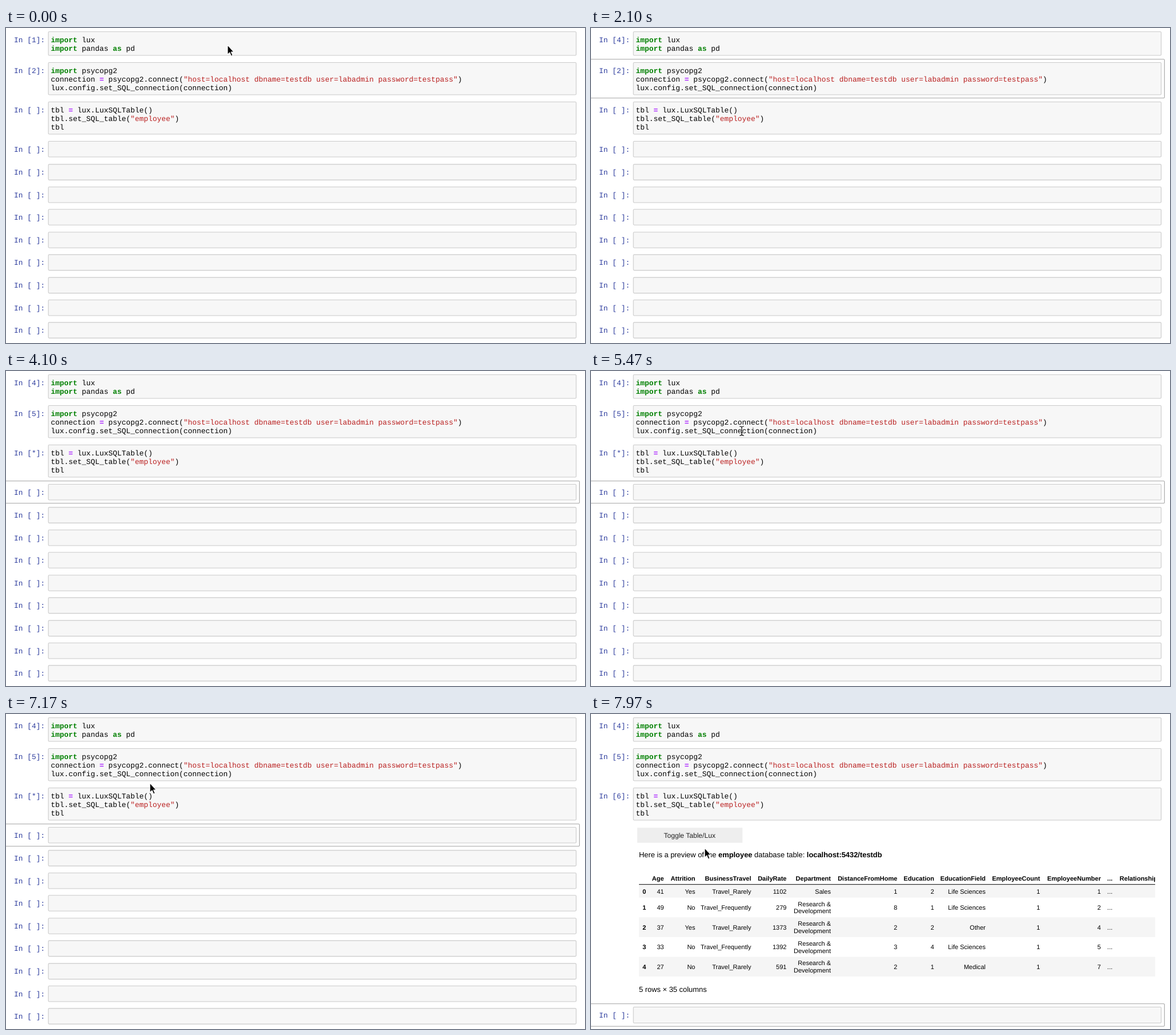
An HTML page for the animation above (8000 ms loop, 1014 by 552 pixels).

```html
<!DOCTYPE html>
<html lang="en">
<head>
<meta charset="utf-8">
<title>Notebook</title>
<style>
html, body { margin: 0; width: 100%; height: 100%; overflow: hidden; background: #fff; }
svg { display: block; width: 1014px; height: 552px; }
text { white-space: pre; text-rendering: geometricPrecision; }
.mono { font: 12.915px "Liberation Mono", "Courier New", monospace; }
.sans { font: 12.9px "Liberation Sans", Arial, sans-serif; }
.cell { font: 11.06px "Liberation Sans", Arial, sans-serif; text-anchor: end; }
.b { font-weight: bold; }
.prompt { fill: #303f9f; }
.kw { fill: #008000; font-weight: bold; }
.op { fill: #aa22ff; font-weight: bold; }
.str { fill: #ba2121; }
.box { fill: #f7f7f7; stroke: #cacaca; stroke-width: 1.1; }
#sel { fill: none; stroke: #a3a3a3; stroke-width: 1.1; }
.cursor { stroke-linejoin: round; stroke-linecap: round; }
</style>
</head>
<body>
<svg viewBox="0 0 1014 552" xmlns="http://www.w3.org/2000/svg">
  <g id="cells"></g>
  <g id="empty"></g>
  <g id="output"></g>
  <rect id="sel" x="-5" width="1009.3" rx="1.5"/>
  <path id="arrow" class="cursor" d="M0 0V16.6L3.8 13 6.4 19.2 9 18.1 6.4 12.1H11.2Z" stroke="#fff" stroke-width="1.1"/>
  <g id="beam" class="cursor" fill="none">
    <path d="M-3.5-8Q0-8 0-6Q0-8 3.5-8M0-6V6M-3.5 8Q0 8 0 6Q0 8 3.5 8M-2 3H2" stroke="#fff" stroke-width="2.6"/>
    <path d="M-3.5-8Q0-8 0-6Q0-8 3.5-8M0-6V6M-3.5 8Q0 8 0 6Q0 8 3.5 8M-2 3H2" stroke="#000" stroke-width="1.2"/>
  </g>
</svg>
<script>
const LOOP = 8000, OUTPUT_AT = 7200;
const $ = id => document.getElementById(id);
const text = (x, y, cls, s) => `<text x="${x}" y="${y}" class="${cls}">${s}</text>`;
const span = (cls, s) => `<tspan class="${cls}">${s}</tspan>`;
const kw = s => span('kw', s), op = s => span('op', s), str = s => span('str', s);

function cell(top, height, lines, prompt = 'In [ ]:') {
  return `<rect class="box" x="74.2" y="${top + .5}" width="924.3" height="${height - 1}" rx="1.6"/>` +
    text(14, top + 18.6, 'mono prompt', prompt) +
    lines.map((s, i) => text(78.5, top + 18.6 + i * 15, 'mono', s)).join('');
}

// Cells with code
const code = [
  [6, 42.5, [kw('import') + ' lux', kw('import') + ' pandas ' + kw('as') + ' pd']],
  [60, 57.5, [
    kw('import') + ' psycopg2',
    'connection ' + op('=') + ' psycopg2.connect(' +
      str('"host=localhost dbname=testdb user=labadmin password=testpass"') + ')',
    'lux.config.set_SQL_connection(connection)']],
  [129, 57.5, ['tbl ' + op('=') + ' lux.LuxSQLTable()', 'tbl.set_SQL_table(' + str('"employee"') + ')', 'tbl']]
];
$('cells').innerHTML = code.map(c => cell(...c)).join('');
const prompts = [...$('cells').querySelectorAll('.prompt')];

const tops = [198, 238.4, 278, 317.2, 357.2, 396.6, 436.6, 476, 515.4];
$('empty').innerHTML = tops.map(y => cell(y, 28.5, [])).join('');

// Table output
const right = [96.5, 127.7, 182.5, 280.5, 342.5, 420, 536.5, 601, 691, 786.5, 893, 913.3];
const head = ['', 'Age', 'Attrition', 'BusinessTravel', 'DailyRate', 'Department', 'DistanceFromHome',
  'Education', 'EducationField', 'EmployeeCount', 'EmployeeNumber', '...'];
const RD = 'Research &amp;|Development';
const rows = [
  [0, 41, 'Yes', 'Travel_Rarely', 1102, 'Sales', 1, 2, 'Life Sciences', 1, 1, '...'],
  [1, 49, 'No', 'Travel_Frequently', 279, RD, 8, 1, 'Life Sciences', 1, 2, '...'],
  [2, 37, 'Yes', 'Travel_Rarely', 1373, RD, 2, 2, 'Other', 1, 4, '...'],
  [3, 33, 'No', 'Travel_Frequently', 1392, RD, 3, 4, 'Life Sciences', 1, 5, '...'],
  [4, 27, 'No', 'Travel_Rarely', 591, RD, 2, 1, 'Medical', 1, 7, '...']
];
function tableCell(value, col, y) {
  const cls = col ? 'cell' : 'cell b', parts = String(value).split('|');
  return parts.map((s, i) => text(right[col], y + (i - (parts.length - 1) / 2) * 12.7, cls, s)).join('');
}
function tableRow(row, i) {
  const top = i ? 321.7 + (i - 1) * 34.6 : 299.5, height = i ? 34.6 : 22.2;
  const stripe = i % 2 ? '' : `<rect x="84" y="${top}" width="904" height="${height}" fill="#f5f5f5"/>`;
  return stripe + row.map((v, c) => tableCell(v, c, top + height / 2 + 4)).join('');
}
$('output').innerHTML =
  '<rect x="81" y="199.3" width="184.3" height="26.4" fill="#eee"/>' +
  '<text x="172.7" y="217" class="sans" style="font-size:12.1px" text-anchor="middle" fill="#222">Toggle Table/Lux</text>' +
  text(84, 251.3, 'sans', 'Here is a preview of the ' + span('b', 'employee') +
    ' database table: ' + span('b', 'localhost:5432/testdb')) +
  rows.map(tableRow).join('') +
  head.map((s, c) => text(right[c], 291.8, 'cell b', s)).join('') +
  '<svg x="920" y="280" width="68" height="18"><text x="5.8" y="11.8" class="cell b" style="text-anchor:start">RelationshipSatisfaction</text></svg>' +
  '<path d="M84 298.7H988" stroke="#000" stroke-width="1"/>' +
  text(84, 486.5, 'sans', '5 rows × 35 columns') +
  cell(513, 29, []);

// Value of the last step whose time has passed
const step = (t, steps) => steps.reduce((v, [at, next]) => t >= at ? next : v, null);

const labels = [
  [[0, '1'], [970, '*'], [1000, '4']],
  [[0, '2'], [2330, '*'], [2370, '5']],
  [[0, ' '], [3370, '*'], [OUTPUT_AT, '6']]
];
const selection = [[570, [6, 42.5]], [970, [60, 57.5]], [2330, [129, 57.5]], [3370, [198, 28.5]], [OUTPUT_AT, [513, 29]]];

// Pointer moves: start, end, from, to
const moves = [
  [0, 1, [388, 30], [388, 30]],
  [5130, 5470, [394, 37], [264, 105]],
  [5730, 6300, [264, 105], [252, 121]],
  [7450, 7970, [252, 121], [199, 235]]
];
function pointer(t) {
  const [start, end, from, to] = moves.filter(m => t >= m[0]).pop();
  const p = Math.min(1, (t - start) / (end - start)), e = p * p * (3 - 2 * p);
  return from.map((v, i) => v + (to[i] - v) * e);
}

function show(el, on) { el.style.display = on ? '' : 'none'; }

function draw(t) {
  prompts.forEach((el, i) => {
    const label = `In [${step(t, labels[i])}]:`;
    if (el.textContent !== label) el.textContent = label;
  });
  const done = t >= OUTPUT_AT;
  show($('empty'), !done);
  show($('output'), done);

  const box = step(t, selection);
  show($('sel'), box);
  if (box) {
    $('sel').setAttribute('y', box[0] - 5.3);
    $('sel').setAttribute('height', box[1] + 10.6);
  }

  const [x, y] = pointer(t);
  const visible = t < 970 || t >= 5130;
  const overCode = t > 970 && code.some(([top, h]) => y > top && y < top + h);
  show($('arrow'), visible && !overCode);
  show($('beam'), visible && overCode);
  for (const id of ['arrow', 'beam']) $(id).setAttribute('transform', `translate(${x} ${y})`);
}

const began = performance.now();
function frame() {
  draw((performance.now() - began) % LOOP);
  requestAnimationFrame(frame);
}
frame();
</script>
</body>
</html>
```
